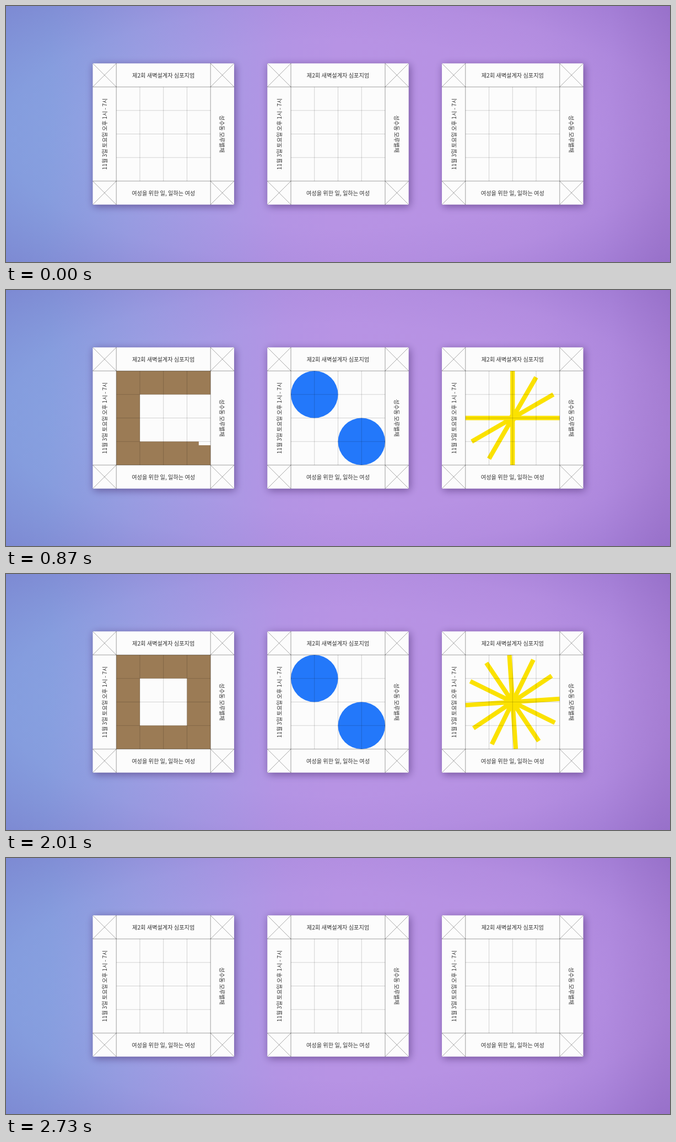
Recreate the animation shown at these times as an HTML page with a canvas. Size 1205x465 px, loop 2.82 s.

```html
<!DOCTYPE html>
<html lang="ko">
<head>
<meta charset="utf-8">
<title>Three cards</title>
<style>
  html, body { margin: 0; width: 100%; height: 100%; overflow: hidden; background: #b592e3; }
  canvas { display: block; width: 1205px; height: 465px; }
</style>
</head>
<body>
<canvas id="stage"></canvas>
<script>
const W = 1205, H = 465, LOOP = 2820, STEP = 30;
const CELL = 42.75, HALF = CELL * 2, SIDE = CELL * 3;
const CY = 232.5, CENTERS = [285.7, 602.5, 919.3];
const BROWN = '#9b7b55', BLUE = '#2378fa', YELLOW = '#fbe200';

const canvas = document.getElementById('stage');
const ctx = canvas.getContext('2d');
const dpr = window.devicePixelRatio || 1;
canvas.width = W * dpr;
canvas.height = H * dpr;

const span = (t, start, length) => Math.min(1, Math.max(0, (t - start) / length));
const quad = u => u < .5 ? 2 * u * u : 1 - 2 * (1 - u) ** 2;
const eased = (t, start, length) => quad(span(t, start, length));

function background() {
  const base = ctx.createLinearGradient(0, 0, W, 40);
  [[0, '#86a2e1'], [.07, '#88a2e1'], [.2, '#9a9fe3'], [.3, '#a69ae4'], [.42, '#b394e4'],
   [.5, '#b793e4'], [.8, '#b791e3'], [.91, '#b28ce0'], [1, '#a981d5']]
    .forEach(([at, color]) => base.addColorStop(at, color));
  ctx.fillStyle = base;
  ctx.fillRect(0, 0, W, H);

  ctx.save();
  ctx.translate(W / 2, H / 2);
  ctx.scale(W / H, 1);
  const shade = ctx.createRadialGradient(0, 0, 170, 0, 0, 330);
  shade.addColorStop(0, 'rgba(96,60,165,0)');
  shade.addColorStop(.4, 'rgba(96,60,165,.05)');
  shade.addColorStop(1, 'rgba(96,60,165,.24)');
  ctx.fillStyle = shade;
  ctx.fillRect(-H / 2, -H / 2, H, H);
  ctx.restore();
}

function lines(color, width, list) {
  ctx.strokeStyle = color;
  ctx.lineWidth = width;
  ctx.beginPath();
  for (const [x1, y1, x2, y2] of list) {
    ctx.moveTo(x1 * CELL, y1 * CELL);
    ctx.lineTo(x2 * CELL, y2 * CELL);
  }
  ctx.stroke();
}

function label(text, x, y, angle = 0) {
  ctx.save();
  ctx.translate(x, y);
  ctx.rotate(angle);
  ctx.fillText(text, 0, .6);
  ctx.restore();
}

function paper() {
  ctx.save();
  ctx.shadowColor = 'rgba(50,20,85,.5)';
  ctx.shadowBlur = 14 * dpr;
  ctx.shadowOffsetX = 2 * dpr;
  ctx.shadowOffsetY = 3 * dpr;
  ctx.fillStyle = '#fcfcfc';
  ctx.fillRect(-SIDE, -SIDE, SIDE * 2, SIDE * 2);
  ctx.restore();
}

function rules() {
  const inner = [], outer = [], cross = [];
  for (const k of [-1, 0, 1]) inner.push([k, -2, k, 2], [-2, k, 2, k]);
  for (const k of [-2, 2]) outer.push([k, -3, k, 3], [-3, k, 3, k]);
  for (const x of [-3, 2]) for (const y of [-3, 2])
    cross.push([x, y, x + 1, y + 1], [x + 1, y, x, y + 1]);
  lines('rgba(0,0,0,.19)', .9, inner);
  lines('rgba(0,0,0,.42)', .9, outer);
  lines('rgba(0,0,0,.42)', .8, cross);
}

function labels() {
  const off = CELL * 2.5;
  ctx.fillStyle = '#333';
  ctx.font = '10.2px "Noto Sans CJK KR", "Noto Sans CJK", "Noto Sans CJK JP", sans-serif';
  ctx.textAlign = 'center';
  ctx.textBaseline = 'middle';
  label('제2회 새벽설계자 심포지엄', 0, -off);
  label('여성을 위한 일, 일하는 여성', 0, off);
  label('11월 3일 토요일 오후 1시 - 7시', -off, 0, -Math.PI / 2);
  label('성수동 모루별채', off, 0, Math.PI / 2);
}

// Square band, counterclockwise from the top right; drawn over two laps.
function band(t) {
  const a = CELL * 1.5, lap = a * 8, corner = CELL * 9.5;
  let from = 0, to = lap * eased(t, 240, 900);
  const gap = lap * span(t, 2025, 705);
  if (gap > 0) {
    from = corner + gap * .315;
    to = corner + lap - gap * .685;
  }
  if (to - from < .1) return;
  ctx.save();
  ctx.strokeStyle = BROWN;
  ctx.lineWidth = CELL;
  ctx.setLineDash([to - from, lap * 3]);
  ctx.lineDashOffset = -from;
  ctx.beginPath();
  ctx.moveTo(HALF, -a);
  for (let i = 0; i < 2; i++) {
    ctx.lineTo(-a, -a);
    ctx.lineTo(-a, a);
    ctx.lineTo(a, a);
    ctx.lineTo(a, -a);
  }
  ctx.stroke();
  ctx.restore();
}

function discs(t) {
  const sizes = [
    eased(t, 240, 450) - eased(t, 2010, 240),
    eased(t, 366, 450) - eased(t, 2250, 270)
  ];
  ctx.fillStyle = BLUE;
  sizes.forEach((size, i) => {
    const c = i ? CELL : -CELL;
    ctx.beginPath();
    ctx.arc(c, c, CELL * Math.max(0, size), 0, Math.PI * 2);
    ctx.fill();
  });
}

function burst(t) {
  const u = span(t, 1710, 1080);
  const turn = 45 * (u < .5 ? 4 * u ** 3 : 1 - 4 * (1 - u) ** 3);
  ctx.strokeStyle = YELLOW;
  ctx.lineWidth = 8.2;
  ctx.beginPath();
  for (let i = 0; i < 6; i++) {
    const r = HALF * (eased(t, 240 + i * 150, 150) - eased(t, 2010 + (5 - i) * 91, 91));
    if (r < .05) continue;
    const angle = (i * 30 - turn) * Math.PI / 180;
    const x = Math.sin(angle) * r, y = -Math.cos(angle) * r;
    ctx.moveTo(x, y);
    ctx.lineTo(-x, -y);
  }
  ctx.stroke();
}

const shapes = [band, discs, burst];

function draw(now) {
  const t = Math.floor((now % LOOP) / STEP) * STEP;
  ctx.setTransform(dpr, 0, 0, dpr, 0, 0);
  background();
  shapes.forEach((shape, i) => {
    ctx.save();
    ctx.translate(CENTERS[i], CY);
    paper();
    shape(t);
    rules();
    labels();
    ctx.restore();
  });
  requestAnimationFrame(loop);
}

const begin = performance.now();
function loop() {
  draw(performance.now() - begin);
}
loop();
</script>
</body>
</html>
```
